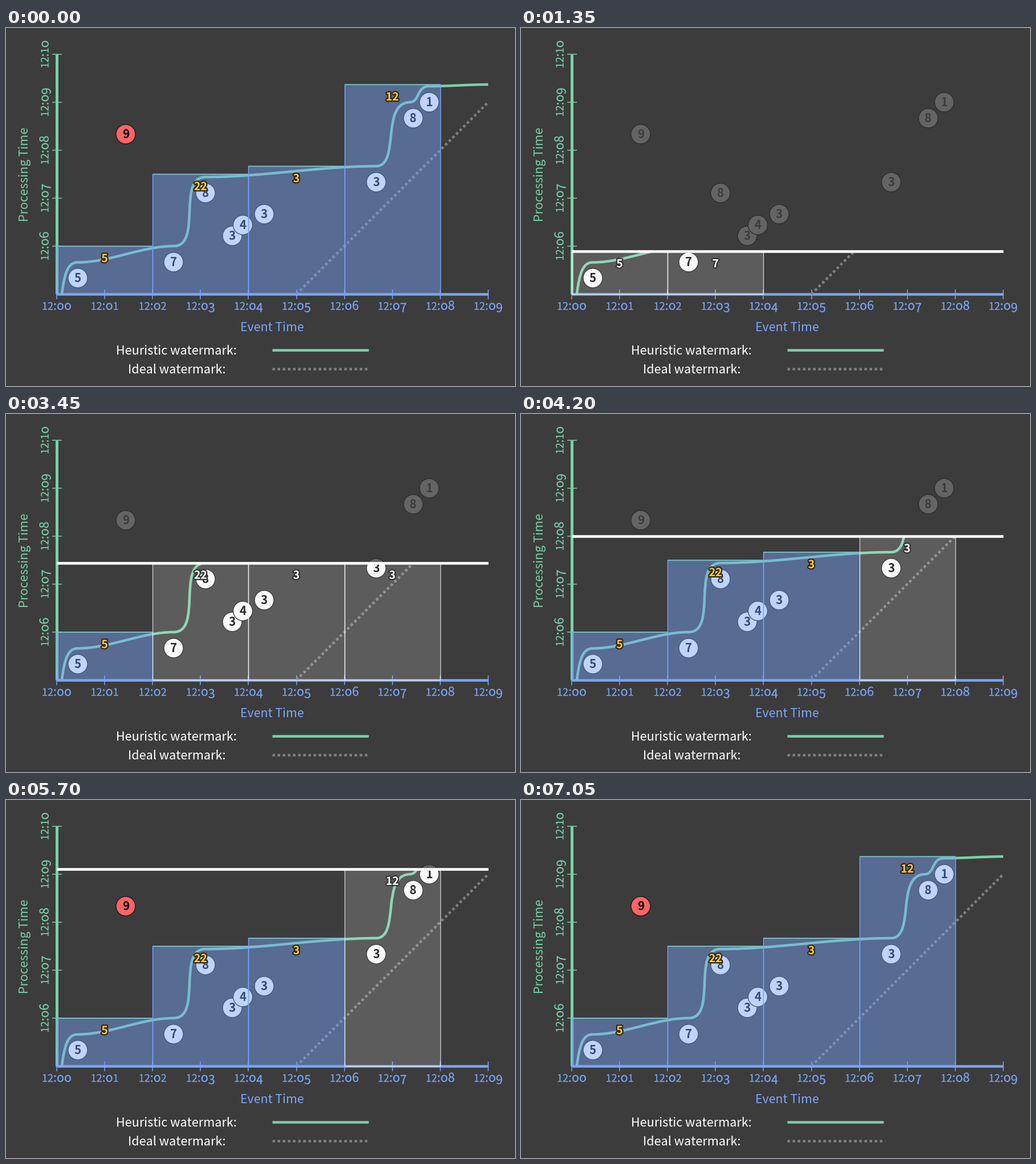
Write a matplotlib script that moves like this. It is 893 px wide and 627 px high and loops after 8000 ms.

```python
import matplotlib.pyplot as plt
import numpy as np
from matplotlib.animation import FuncAnimation
from matplotlib.patches import Circle, PathPatch, Rectangle
from matplotlib.path import Path
from matplotlib.patheffects import withStroke
from matplotlib.textpath import TextPath
from matplotlib.transforms import Affine2D, Bbox, TransformedBbox

W, H, DPI = 893, 627, 64
PT = 72 / DPI                      # points per pixel
FONT = "Noto Sans CJK JP"
BG, GREEN, BLUE, DOTTED = "#3c3c3c", "#79d0aa", "#7aa5fb", "#808080"
LEFT, RIGHT, TOP, BASE = 89, 846, 46, 466
MINUTE_X, MINUTE_Y = 84.1, 84
FRAME_MS, STEP_MS, LOOP_MS = 50, 150, 8000
LAST = 47                          # step at which the sweep is over

# x, y, value of each event; the late one arrives after its window closed
EVENTS = [(126, 438, 5), (294, 410, 7), (397, 364, 3), (415.5, 345, 4),
          (453, 326, 3), (350, 289, 8), (649.5, 270, 3), (210, 186, 9),
          (714.5, 158, 8), (742.5, 130, 1)]
LATE = 9
CLOSE_Y = [382, 256, 242, 99]      # height at which each window closes

fig = plt.figure(figsize=(W / DPI, H / DPI), dpi=DPI, facecolor=BG)
ax = fig.add_axes([0, 0, 1, 1])
ax.set_xlim(0, W)
ax.set_ylim(H, 0)
ax.axis("off")

past = Bbox([[0, BASE], [W, H]])   # everything below the sweep line
past_clip = TransformedBbox(past, ax.transData)


def clip_to_past(artist):
    artist.set_clip_on(True)
    artist.set_clip_box(past_clip)
    return artist


def line(xs, ys, color, width, z=1, **kw):
    kw.setdefault("solid_capstyle", "butt")
    return ax.plot(xs, ys, color=color, lw=width * PT, zorder=z, **kw)[0]


def text(x, y, s, size, color, z=1, **kw):
    return ax.text(x, y, s, fontsize=size * PT, color=color, zorder=z,
                   family=FONT, ha="center", va="baseline", **kw)


def clock(x, y, s, color, turned=False):
    """Clock label with old-style figures, centred on x, y."""
    advance = {":": 0.278, "0": 0.606}
    parts, pen = [], 0
    for ch in s:
        size = 18 if ch in "12" else 21.5
        drop = 4 if ch in "34579" else 0
        parts.append(TextPath((pen, -drop), "o" if ch == "0" else ch,
                              size=size, prop={"family": FONT}))
        pen += advance.get(ch, 0.555) * size
    place = Affine2D().translate(-pen / 2, 0).scale(1, -1)
    if turned:
        place.rotate_deg(-90)
    path = Path.make_compound_path(*parts).transformed(place.translate(x, y))
    ax.add_patch(PathPatch(path, fc=color, ec=color, lw=0.25 * PT))


def dot(x, y, value, fill, ink, edge, z):
    ring = ax.add_patch(Circle((x, y), 17, fc=fill, ec=edge, lw=1.4 * PT,
                               zorder=z))
    return ring, text(x, y + 7.4, str(value), 20.5, ink, z, weight="bold")


# axes
line([LEFT, RIGHT], [BASE, BASE], BLUE, 4.5)
line([LEFT, LEFT], [TOP, BASE], GREEN, 5)
for i in range(10):
    x = LEFT + i * MINUTE_X
    line([x, x], [458, 475], BLUE, 1.5)
    clock(x, 493.5, f"12:0{i}", BLUE)
for i in range(5):
    y = BASE - (i + 1) * MINUTE_Y
    line([81, 98], [y, y], GREEN, 1.5)
    clock(74.5, y, f"12:{i + 6:02d}", GREEN, turned=True)
text(467, 531, "Event Time", 21.4, BLUE)
text(39, 256, "Processing Time", 21.6, GREEN, rotation=90,
     rotation_mode="anchor")

# legend
DASH = (0, (1, 1))
text(299, 572, "Heuristic watermark:", 21.6, "white")
text(299.5, 605, "Ideal watermark:", 21.6, "white")
line([467, 636], [563.5, 563.5], GREEN, 4.5)
line([467, 636], [597, 597], DOTTED, 4.5, ls=DASH, dash_capstyle="butt")

# events: dim until the sweep passes, bright afterwards
for i, (x, y, value) in enumerate(EVENTS):
    dot(x, y, value, "#646464", "#3c3c3c", "#2e2e2e", 2 + i / 100)
    fill = "#ff6464" if value == LATE else "#f8f8f8"
    for part in dot(x, y, value, fill, "black", "#1c1c1c", 4 + i / 100):
        clip_to_past(part)

# watermarks
clip_to_past(line([LEFT + 5 * MINUTE_X, RIGHT], [BASE, BASE - 4 * MINUTE_Y],
                  DOTTED, 4.5, 3, ls=DASH, dash_capstyle="butt"))
CURVE = [(98, 466),
         (103, 425), (110, 410.5), (126, 410.5),
         (182, 410.5), (238, 382), (294, 382),
         (345, 382), (299, 261), (350, 261),
         (450, 261), (549, 242), (649, 242),
         (692, 242), (657, 132), (708, 130),
         (726, 130), (720, 102), (742, 102),
         (777, 102), (811, 99), (846, 99)]
codes = [Path.MOVETO] + [Path.CURVE4] * (len(CURVE) - 1)
clip_to_past(ax.add_patch(PathPatch(Path(CURVE, codes), fc="none", ec=GREEN,
                                    lw=4.5 * PT, zorder=3.5,
                                    capstyle="butt")))


class Window:
    def __init__(self, index):
        self.x = LEFT + 2 * MINUTE_X * index
        self.width = 2 * MINUTE_X
        self.close = CLOSE_Y[index]
        self.events = [(y, v) for x, y, v in EVENTS
                       if self.x <= x < self.x + self.width]
        self.box = ax.add_patch(Rectangle((self.x, BASE), self.width, 0,
                                          lw=1.4 * PT, zorder=5))
        self.lid = line([self.x, self.x + self.width], [self.close] * 2,
                        "#78c6b4", 1.5, 5.5)
        self.label = text(self.x + self.width / 2, 0, "", 19.5, "white", 6,
                          weight="bold")

    def update(self, sweep):
        top = max(sweep, self.close)
        closed = sweep <= self.close + 0.01
        seen = [v for y, v in self.events if y >= top - 0.5]
        for part in (self.box, self.label):
            part.set_visible(bool(seen))
        self.lid.set_visible(closed)
        self.box.set_bounds(self.x, top, self.width, BASE - top)
        self.box.set_facecolor((0.48, 0.65, 1, 0.45) if closed
                               else (1, 1, 1, 0.165))
        self.box.set_edgecolor(BLUE if closed else (1, 1, 1, 0.7))
        self.label.set_text(str(sum(seen)))
        self.label.set_y(top + 28)
        self.label.set_color("#ffcb3c" if closed else "white")
        outline = "#35290f" if closed else "#363636"
        self.label.set_path_effects([withStroke(linewidth=4.6 * PT,
                                                foreground=outline)])


windows = [Window(i) for i in range(4)]
sweep_line = line([LEFT, RIGHT], [BASE, BASE], "white", 4.7, 7)


def draw(frame):
    step = min(frame * FRAME_MS // STEP_MS, LAST)
    running = 0 < step < LAST
    sweep = BASE - (step - 1) * MINUTE_Y / 9 if running else TOP
    past.set_points(np.array([[0, sweep], [W, H]], float))
    sweep_line.set_visible(running)
    sweep_line.set_ydata([sweep, sweep])
    for window in windows:
        window.update(sweep)
    return []


anim = FuncAnimation(fig, draw, frames=LOOP_MS // FRAME_MS, interval=FRAME_MS,
                     repeat=True, repeat_delay=0)
plt.show()
```
